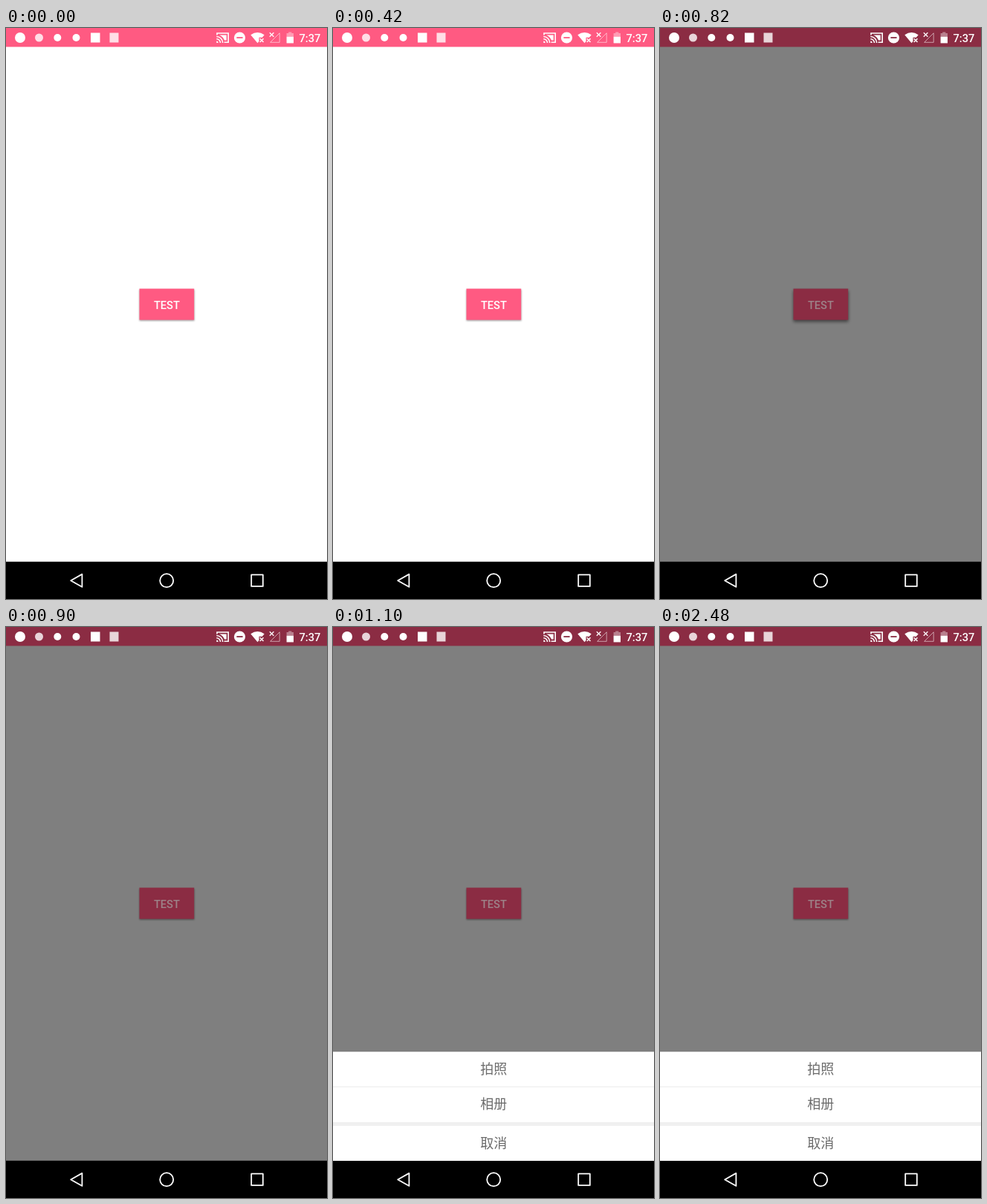
An HTML page for the animation above (3400 ms loop, 432 by 768 pixels).

```html
<!DOCTYPE html>
<html lang="zh-CN">
<head>
<meta charset="utf-8">
<title>Bottom sheet</title>
<style>
  html, body { margin: 0; width: 100%; height: 100%; overflow: hidden; background: #fff; }
  svg { display: block; width: 100vw; height: 100vh; }
  .ui { font: 500 14.7px Roboto, sans-serif; }
  .sheet { font: 18px "Noto Sans CJK SC", "Noto Sans CJK", sans-serif; fill: #6b6b6b; text-anchor: middle; }
</style>
</head>
<body>
<svg viewBox="0 0 432 768" xmlns="http://www.w3.org/2000/svg">
  <defs>
    <filter id="soft" x="-20%" y="-30%" width="140%" height="160%"><feGaussianBlur stdDeviation="1"/></filter>
    <filter id="wide" x="-20%" y="-30%" width="140%" height="160%"><feGaussianBlur stdDeviation="2"/></filter>
  </defs>

  <rect id="page" width="432" height="768"/>
  <rect id="bar" width="432" height="25.4"/>

  <g id="shadow"><rect id="shade" x="179.5" width="74" height="42"/></g>
  <rect id="button" x="179.5" y="350.6" width="73.7" height="42"/>
  <text id="label" class="ui" x="216.4" y="377.6" text-anchor="middle">TEST</text>

  <!-- notification placeholders -->
  <g fill="#fff">
    <circle cx="19" cy="13" r="7"/>
    <circle cx="44.5" cy="13" r="5.5" opacity=".8"/>
    <circle cx="69.3" cy="13" r="5"/>
    <circle cx="94.5" cy="13" r="5"/>
    <rect x="114" y="6.5" width="12.5" height="13"/>
    <rect x="139.5" y="6.5" width="12" height="13" opacity=".8"/>
  </g>

  <!-- system status -->
  <g fill="none" stroke="#fff" stroke-width="1.6">
    <path d="M284 9.5V7H299.2V19.2H293.6"/>
    <path d="M283.3 11.5A8.4 8.4 0 0 1 291.7 19.9M283.3 14.7A5.2 5.2 0 0 1 288.5 19.9"/>
    <path d="M287.2 9.6H296.7V16.6H294Q292 11.5 287.2 9.6Z" fill="#fff" stroke="none"/>
    <path d="M283.3 17.5A2.4 2.4 0 0 1 285.7 19.9H283.3Z" fill="#fff" stroke="none"/>
  </g>
  <circle cx="314.5" cy="13" r="7.6" fill="#fff"/>
  <rect id="minus" x="310.4" y="12.1" width="8.2" height="1.8"/>
  <path d="M329.3 9.2Q338.5 2.6 347.7 9.2L344.8 12.8H340.5V18L338.5 20.3Z" fill="#fff"/>
  <path d="M341.7 14.2L346.5 19M346.5 14.2L341.7 19" stroke="#fff" stroke-width="1.5"/>
  <path d="M368.2 6.8V19.3H355.7Z" fill="none" stroke="#fff" stroke-width="1" opacity=".55"/>
  <path d="M354.8 6.2L360.4 11.8M360.4 6.2L354.8 11.8" stroke="#fff" stroke-width="1.3"/>
  <path d="M377.6 12V7H380.2V5.4H384.4V7H387V12Z" fill="#fff" opacity=".4"/>
  <rect x="377.6" y="11.8" width="9.4" height="8.6" fill="#fff"/>
  <text class="ui" x="394.5" y="18.7" fill="#fff">7:37</text>

  <rect y="717.8" width="432" height="50.2"/>
  <g id="sheet">
    <rect y="571.3" width="432" height="146.7" fill="#fff"/>
    <rect y="618" width="432" height="1" fill="#ececec"/>
    <rect y="666" width="432" height="5" fill="#f0f0f0"/>
    <g class="sheet">
      <text x="216.2" y="601.3">拍照</text>
      <text x="216.2" y="648.3">相册</text>
      <text x="216.2" y="700.5">取消</text>
    </g>
  </g>
  <g fill="none" stroke="#fff" stroke-width="1.8" stroke-linejoin="round">
    <path d="M102.4 734.6V751.8L87.2 743.2Z"/>
    <circle cx="216.2" cy="743.2" r="9"/>
    <rect x="330.2" y="735.3" width="15.6" height="15.6"/>
  </g>
</svg>
<script>
  const LOOP = 3400, DIM = 700, RELEASE = 900, OPEN = 1000, SETTLE = 1100;
  const el = id => document.getElementById(id);
  const set = (id, attrs) => {
    for (const key in attrs) el(id).setAttribute(key, attrs[key]);
  };

  function draw(t) {
    const dim = t >= DIM;
    const raised = dim && t < RELEASE;
    const pink = dim ? '#8b2c43' : '#ff5a82';
    set('page', { fill: dim ? '#7f7f7f' : '#fff' });
    for (const id of ['bar', 'button', 'minus']) set(id, { fill: pink });
    set('label', { fill: dim ? '#9d8288' : '#fff' });
    set('shade', { y: raised ? 353.2 : 352, opacity: raised ? 0.5 : 0.35 });
    set('shadow', { filter: raised ? 'url(#wide)' : 'url(#soft)' });
    set('sheet', {
      visibility: t >= OPEN ? 'visible' : 'hidden',
      transform: `translate(0 ${t < SETTLE ? 8 : 0})`
    });
  }

  const start = performance.now();
  function tick() {
    draw((performance.now() - start) % LOOP);
    requestAnimationFrame(tick);
  }
  draw(0);
  requestAnimationFrame(tick);
</script>
</body>
</html>
```
